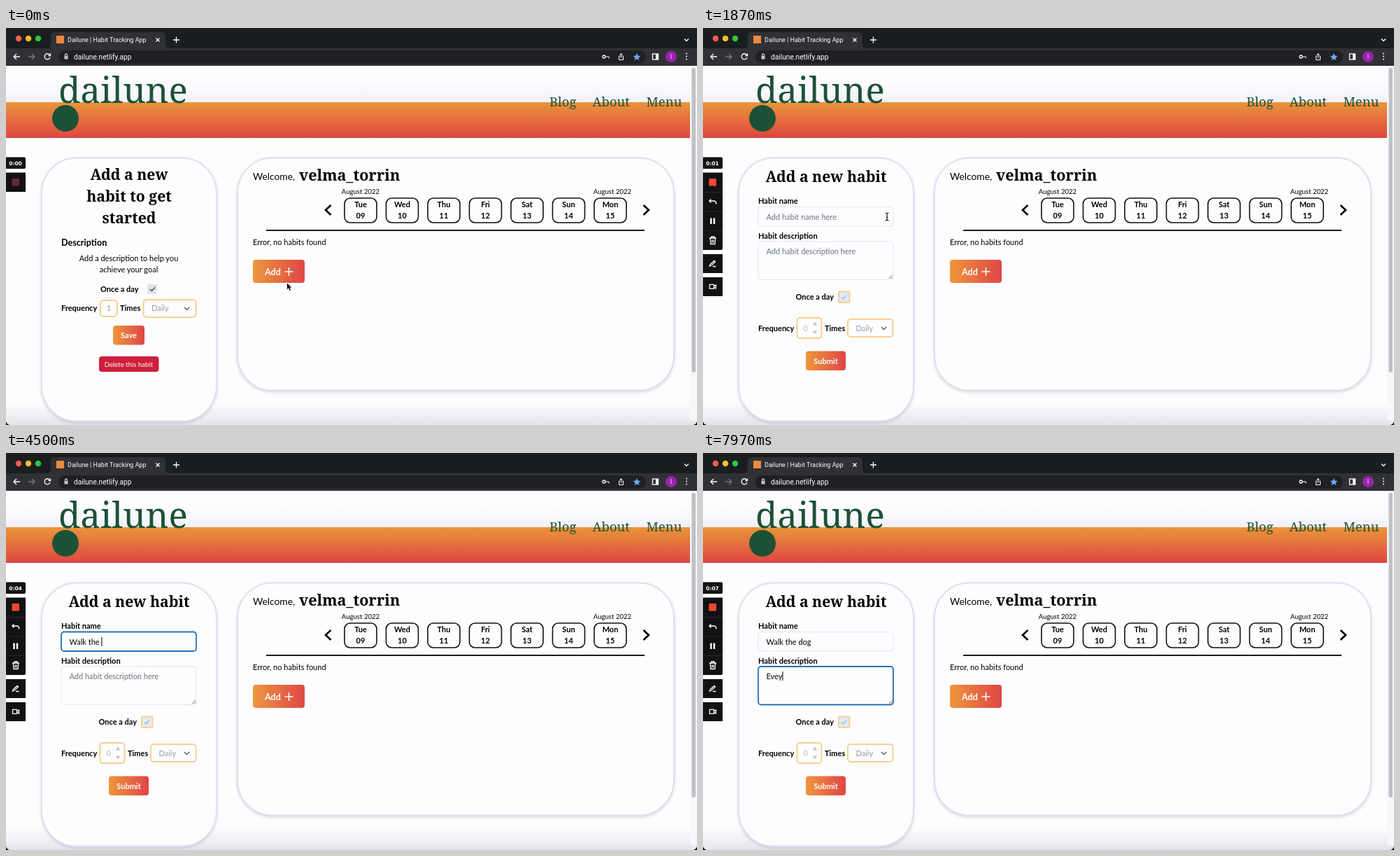
An HTML page for the animation above (8000 ms loop, 988 px wide and 567 px high).

```html
<!DOCTYPE html>
<html lang="en">
<head>
<meta charset="utf-8">
<title>Habit tracker</title>
<style>
html, body { margin: 0; width: 100%; height: 100%; overflow: hidden; background: #000; }
svg { display: block; width: 100vw; height: 100vh; }
text { font: 11px Lato, sans-serif; white-space: pre; }
.b { font-weight: 700; }
.mid { text-anchor: middle; }
.small { font-size: 9.6px; }
.ui { font-family: Roboto, sans-serif; }
.serif { font-family: "Noto Serif", serif; }
.head { font: 700 21.2px "Noto Serif", serif; text-anchor: middle; }
.nav { font: 18.5px "Noto Serif", serif; fill: #1d5136; }
.hint { fill: #6b7280; }
.off { fill: #999ca3; }
.white { fill: #fff; }
.line { fill: none; stroke: #fff; stroke-width: 1.3; }
.card { fill: #fdfdff; stroke: #dce0f1; stroke-width: 2; filter: drop-shadow(0 2px 2px #0002); }
.box { fill: #fdfdff; stroke: #e1e5ef; }
.box.focus { stroke: #2470b5; stroke-width: 1.8; }
.amber { fill: #fdfdff; stroke: #fad08f; stroke-width: 2; }
.day { fill: #fdfdff; stroke: #111; stroke-width: 1.6; }
.dark { fill: #111214; }
</style>
</head>
<body>
<svg viewBox="0 0 988 567" preserveAspectRatio="none">
  <defs>
    <linearGradient id="warm"><stop stop-color="#ee963d"/><stop offset="1" stop-color="#df4545"/></linearGradient>
    <linearGradient id="band" x2="0" y2="1"><stop stop-color="#e9963a"/><stop offset="1" stop-color="#df4542"/></linearGradient>
    <linearGradient id="haze" x2="0" y2="1"><stop stop-color="#fdfdff"/><stop offset="1" stop-color="#f1f1fb"/></linearGradient>
    <linearGradient id="floor" x2="0" y2="1"><stop stop-color="#fdfdff"/><stop offset="1" stop-color="#e4e4ec"/></linearGradient>
  </defs>

  <!-- Browser window -->
  <rect y="40" width="988" height="527" rx="7" fill="#fdfdff"/>
  <path d="M0 535H988V560Q988 567 981 567H7Q0 567 0 560Z" fill="url(#floor)"/>
  <rect width="988" height="30" fill="#1b1e20"/>
  <path d="M58 29Q64 29 64 23V12Q64 6 70 6H222Q228 6 228 12V23Q228 29 234 29H988V54H0V29Z" fill="#303135"/>
  <rect x="75" y="32" width="840" height="19" rx="9.5" fill="#1f2023"/>
  <circle cx="18" cy="15" r="4.2" fill="#fe5b54"/>
  <circle cx="32" cy="15" r="4.2" fill="#fdbc2e"/>
  <circle cx="46" cy="15" r="4.2" fill="#2bc840"/>
  <rect x="72" y="11" width="11" height="11" fill="#ec8a3d"/>
  <text class="ui white" x="88" y="20" style="font-size:9px">Dailune | Habit Tracking App</text>
  <text class="ui white" x="97" y="45" style="font-size:10.2px">dailune.netlify.app</text>
  <g class="line">
    <path d="M214.500 14.500l5 5m0-5l-5 5M239 17h9m-4.500-4.500v9M970 15.500l3 3 3-3"/>
    <path d="M20 41H11m4-4l-4 4 4 4M62.500 38.500A4 4 0 1 0 63 42M63.500 36.500v3h-3"/>
    <path d="M32 41h9m-4-4l4 4-4 4" stroke="#77797d"/>
    <path d="M84.500 40v-1.500a1.500 1.500 0 0 1 3 0V40" stroke="#c4c6ca"/>
    <path d="M857.500 41h4.500v2.500M878 40h-1.500v5.500h6V40h-1.500M879.500 43v-6.500m-2 2l2-2 2 2" stroke-width="1"/>
    <circle cx="855" cy="41" r="2"/>
    <rect x="924.500" y="37" width="8" height="8"/>
  </g>
  <rect x="83.500" y="40" width="5" height="4.500" fill="#c4c6ca"/>
  <rect x="929" y="37" width="4" height="8" fill="#fff"/>
  <path d="M902 36l1.500 3.600 3.900.3-3 2.500 1 3.800-3.400-2.100-3.400 2.100 1-3.800-3-2.500 3.900-.3Z" fill="#6fa8fb"/>
  <circle cx="951" cy="41" r="8" fill="#9a23ae"/>
  <text class="ui white mid" x="951" y="44" style="font-size:8.500px">I</text>
  <path d="M973 36.500v9" stroke="#fff" stroke-width="2" stroke-linecap="round" stroke-dasharray="0 4"/>

  <!-- Page header -->
  <rect y="78" width="978" height="28" fill="url(#haze)"/>
  <rect y="106" width="978" height="51" fill="url(#band)"/>
  <rect x="978" y="54" width="10" height="506" fill="#f7f7f9"/>
  <rect x="980.500" y="57" width="5.500" height="435" rx="2.700" fill="#bfc0c4"/>
  <circle cx="85" cy="129" r="19" fill="#1d5136"/>
  <text class="serif" x="75" y="107" fill="#1d5136" style="font-size:51px">dailune</text>
  <text class="nav" x="777" y="112">Blog</text>
  <text class="nav" x="838.500" y="112">About</text>
  <text class="nav" x="915.500" y="112">Menu</text>

  <!-- Calendar card -->
  <rect class="card" x="331" y="185.500" width="624" height="332" rx="50"/>
  <text x="353" y="217" style="font-size:13.800px">Welcome,</text>
  <text class="serif b" x="419" y="217.500" style="font-size:21.700px">velma_torrin</text>
  <text class="small mid" x="507" y="237">August 2022</text>
  <text class="small mid" x="867" y="237">August 2022</text>
  <g id="days"></g>
  <path d="M464.500 253l-7.500 7 7.500 7M911.500 253l7.500 7-7.500 7" fill="none" stroke="#000" stroke-width="2.600"/>
  <path d="M372 289H913" stroke="#1c1c20" stroke-width="2"/>
  <text x="353" y="310">Error, no habits found</text>
  <rect id="add" x="353" y="331" width="74" height="33" rx="4"/>
  <text class="b white" x="370" y="352.500" style="font-size:12.600px">Add</text>
  <path class="line" d="M398.500 348h12m-6-6v12" style="stroke-width:1.600"/>

  <!-- Habit card -->
  <rect class="card" x="51" y="185.500" width="250" height="376" rx="50"/>
  <g id="detail">
    <text class="head" x="176" y="217">Add a new</text>
    <text class="head" x="176" y="248">habit to get</text>
    <text class="head" x="176" y="279">started</text>
    <text class="b" x="79" y="311" style="font-size:12.600px">Description</text>
    <text class="mid" x="175.500" y="333">Add a description to help you</text>
    <text class="mid" x="175.500" y="349">achieve your goal</text>
    <text class="b" x="135" y="377">Once a day</text>
    <rect x="202" y="366" width="14" height="14" rx="1" fill="#dfe3ea"/>
    <path d="M206 373l2.500 2.500 4.500-5" fill="none" stroke="#444" stroke-width="1.300"/>
    <text class="b" x="79" y="404">Frequency</text>
    <rect class="amber" x="135" y="389" width="24" height="23" rx="4"/>
    <text class="off mid" x="147" y="404">1</text>
    <text class="b" x="163" y="404">Times</text>
    <rect class="amber" x="196.500" y="388" width="75" height="25" rx="4"/>
    <text class="off" x="208" y="404">Daily</text>
    <path d="M255 399l3.500 3.500 3.500-3.500" fill="none" stroke="#555" stroke-width="1.300"/>
    <rect x="153" y="425" width="45" height="27.500" rx="4" fill="url(#warm)"/>
    <text class="b white mid" x="175.500" y="443">Save</text>
    <rect x="133" y="469" width="85.500" height="22" rx="4" fill="#ce1f3b"/>
    <text class="small white mid" x="175.500" y="483.500">Delete this habit</text>
  </g>
  <g id="form">
    <text class="head" x="176" y="219.500">Add a new habit</text>
    <text class="b" x="79" y="251">Habit name</text>
    <rect id="nameBox" class="box" x="79" y="255.500" width="193" height="27.500" rx="4"/>
    <text id="name" x="90.500" y="273.500"></text>
    <text class="b" x="79" y="300.500">Habit description</text>
    <rect id="noteBox" class="box" x="79" y="305" width="193" height="54.500" rx="4"/>
    <text id="note" x="90.500" y="322.500"></text>
    <path d="M266 358l5-5M269 358l2-2" stroke="#555" stroke-width=".8"/>
    <rect id="caret" width="1" height="13"/>
    <text class="b" x="132.500" y="388">Once a day</text>
    <rect class="amber" x="194" y="376.500" width="15.500" height="15.500" rx="1" style="fill:#e2ebf7"/>
    <path d="M198 384.500l2.500 2.500 4.500-5.500" fill="none" stroke="#9fb5d6" stroke-width="1.300"/>
    <text class="b" x="79" y="432.500">Frequency</text>
    <rect class="amber" x="134.500" y="414" width="35" height="29" rx="4"/>
    <text x="143.500" y="432.500" fill="#bcbec4">0</text>
    <path d="M156.500 424.500l3.500-5 3.500 5ZM156.500 432.500l3.500 5 3.500-5Z" fill="#c6c7cc"/>
    <text class="b" x="174" y="432.500">Times</text>
    <rect class="amber" x="207" y="416" width="64.500" height="25" rx="4"/>
    <text class="off" x="218.500" y="432.500">Daily</text>
    <path d="M255 427l3.500 3.500 3.500-3.500" fill="none" stroke="#555" stroke-width="1.300"/>
    <rect x="147" y="461.500" width="57" height="27.500" rx="4" fill="url(#warm)"/>
    <text class="b white mid" x="175.500" y="479.500">Submit</text>
  </g>

  <!-- Recorder -->
  <path class="dark" d="M0 184.500H26q2 0 2 2V199q0 2-2 2H0ZM0 206.500H28V234H0Z"/>
  <text id="clock" class="white mid" x="13.500" y="195.600" style="font:700 7.500px 'DejaVu Sans', sans-serif"></text>
  <g id="tools">
    <path class="dark" d="M0 234H28V315q0 2-2 2H0ZM0 323H28V350H0ZM0 356H28V383H0Z"/>
    <path d="M0 234.500H28M0 262H28M0 289.500H28" stroke="#292a2d"/>
    <g class="line">
      <path d="M11.500 244.500L9 247l2.500 2.500M9 247h6q4 0 4 4.500"/>
      <path d="M11.500 271.500v8.500M16 271.500v8.500" stroke-width="2.400"/>
      <path d="M9 300h10M12 300v-2h4v2M10.300 300l.7 8.500h6l.7-8.500M13 302.500v4M15 302.500v4"/>
      <path d="M9.500 340l1-2.500 5.500-5 1.500 1.500-5.500 5ZM14 340.500h4.500"/>
      <path d="M9.500 366.300h6v6h-6ZM15.500 369l3-2v5l-3-2"/>
    </g>
  </g>
  <rect id="stop" x="8.500" y="215" width="10.500" height="10.500" rx="1"/>

  <!-- Pointers, hot spot at 0,0 -->
  <g id="arrow"><path d="M-.5-5.500V5l2.400-2.200L3.500 6.500l2-.9L3.900 2H7Z" fill="#000" stroke="#fff" stroke-width=".8"/></g>
  <g id="hand"><path d="M-2.500 4L-4.500 1.500Q-4-.3-2.300 1V-4Q-1.300-5.500-.5-4V-1.200Q1-2 1.500-.8 3-1.500 3.400-.2 5-.6 5 1V3L3.800 6.500H-1Z" fill="#fff" stroke="#000" stroke-width=".9"/></g>
  <g id="beam"><path d="M-2.500-5.500Q0-5.500 0-4 0-5.500 2.500-5.500M0-4V4M-2.500 5.500Q0 5.500 0 4 0 5.500 2.500 5.500M-1.200 1h2.400" fill="none" stroke="#111" stroke-width="1.100"/></g>
</svg>
<script>
const $ = id => document.getElementById(id);
const show = (id, on) => $(id).setAttribute("visibility", on ? "visible" : "hidden");
const LOOP = 8000, TOOLS_AT = 400, OPEN_AT = 600;

const fields = [
  { id: "name", hint: "Add habit name here", text: "Walk the dog", focus: 2000, blur: 6230,
    keys: [3370, 3500, 3630, 3750, 3870, 4070, 4170, 4290, 4410, 4630, 4830, 4960] },
  { id: "note", hint: "Add habit description here", text: "Evey", focus: 6230, blur: LOOP,
    keys: [7130, 7400, 7600, 7830] }
];

// time, x, y of the pointer
const track = [
  [0, 402, 369], [120, 402, 369], [420, 392, 352], [850, 392, 352], [1400, 269, 291],
  [1550, 269, 291], [1900, 263, 269], [5400, 263, 269], [5930, 227, 308], [6200, 206, 322], [LOOP, 206, 322]
];

$("days").innerHTML = ["Tue", "Wed", "Thu", "Fri", "Sat", "Sun", "Mon"].map((day, i) => {
  const x = 507 + 59.5 * i;
  return `<rect class="day" x="${x - 23}" y="243" width="46" height="35" rx="8"/>
    <text class="b mid" x="${x}" y="256">${day}</text>
    <text class="b mid" x="${x}" y="272">${String(9 + i).padStart(2, "0")}</text>`;
}).join("");

function pointerAt(t) {
  const i = track.findIndex(p => p[0] > t);
  const [t0, x0, y0] = track[i - 1], [t1, x1, y1] = track[i];
  const u = (t - t0) / (t1 - t0), ease = u * u * (3 - 2 * u);
  return [x0 + (x1 - x0) * ease, y0 + (y1 - y0) * ease];
}

function drawField({ id, hint, text, focus, blur, keys }, t) {
  const count = keys.filter(k => k <= t).length;
  const active = t >= focus && t < blur;
  const label = $(id);
  label.textContent = text.slice(0, count);
  const end = count ? label.getComputedTextLength() : 0;
  if (!count) label.textContent = hint;
  label.setAttribute("class", count ? "" : "hint");
  $(id + "Box").setAttribute("class", active ? "box focus" : "box");
  if (!active) return;
  const lastInput = count ? keys[count - 1] : focus;
  $("caret").setAttribute("x", 90.5 + end);
  $("caret").setAttribute("y", +label.getAttribute("y") - 10.5);
  show("caret", (t - lastInput) % 1000 < 500);
}

function drawPointer(t) {
  const [x, y] = pointerAt(t);
  const typing = (t >= 3370 && t < 5400) || t >= 7130;
  const overAdd = x > 353 && x < 427 && y < 364 && y > 331;
  const overField = x < 272 && ((y > 255 && y < 283) || (y > 305 && y < 360));
  const kind = typing ? "" : overAdd ? "hand" : overField ? "beam" : "arrow";
  for (const id of ["arrow", "hand", "beam"]) {
    show(id, id === kind);
    $(id).setAttribute("transform", `translate(${x} ${y})`);
  }
  $("add").setAttribute("fill", overAdd ? "#8f2b1c" : "url(#warm)");
}

function draw(t) {
  show("tools", t >= TOOLS_AT);
  $("stop").setAttribute("fill", t < TOOLS_AT ? "#6c2439" : "#fb4630");
  $("clock").textContent = "0:0" + Math.max(0, Math.floor((t - 30) / 1000));
  $("detail").style.display = t < OPEN_AT ? "" : "none";
  $("form").style.display = t < OPEN_AT ? "none" : "";
  show("caret", false);
  fields.forEach(field => drawField(field, t));
  drawPointer(t);
}

const start = performance.now();
function tick() {
  draw((performance.now() - start) % LOOP);
  requestAnimationFrame(tick);
}
tick();
</script>
</body>
</html>
```
